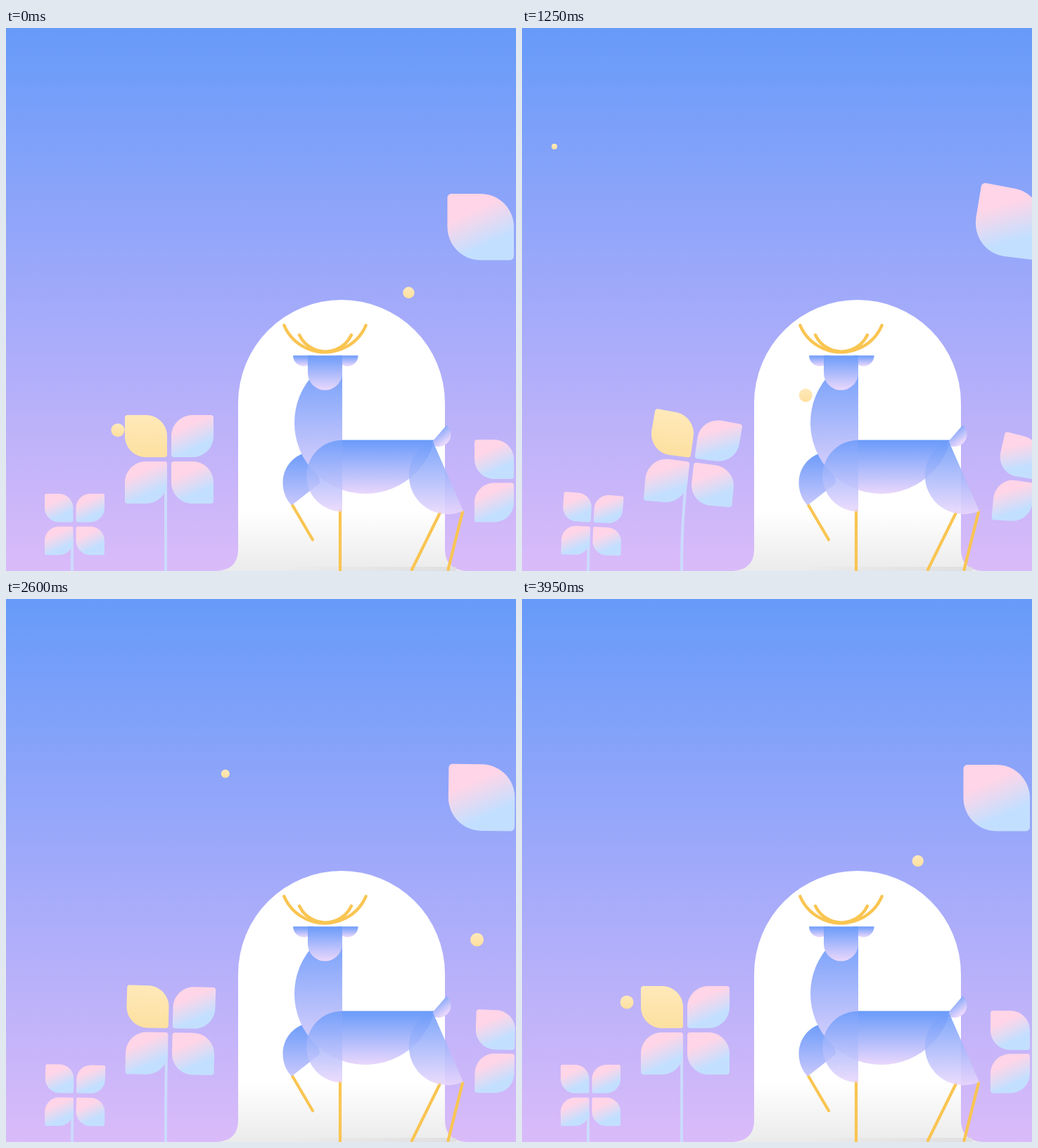
These frames come from a looping animation (725 by 773 pixels, 4000 ms). An HTML page with a canvas:

```html
<!DOCTYPE html>
<html lang="en">
<head>
<meta charset="utf-8">
<title>Deer and flowers</title>
<style>
  html, body { margin: 0; width: 100%; height: 100%; overflow: hidden; }
  canvas { display: block; }
</style>
</head>
<body>
<canvas id="stage" width="725" height="773"></canvas>
<script>
const W = 725, H = 773, LOOP = 4000;
const ctx = document.getElementById('stage').getContext('2d');
const BLUE = '#6a9bfa', LILAC = '#e9d7fc', GOLD = '#f9c552';
const PINK = '#ffd5e7', ICE = '#c3dfff', CREAM = '#ffe9b9', HONEY = '#fde0a0';

function gradient(x0, y0, x1, y1, ...colors) {
  const g = ctx.createLinearGradient(x0, y0, x1, y1);
  colors.forEach((c, i) => g.addColorStop(i / (colors.length - 1), c));
  return g;
}

function fill(style, trace, alpha = 1) {
  ctx.globalAlpha = alpha;
  ctx.fillStyle = style;
  ctx.beginPath();
  trace();
  ctx.fill();
  ctx.globalAlpha = 1;
}

function stroke(style, width, trace) {
  ctx.strokeStyle = style;
  ctx.lineWidth = width;
  ctx.beginPath();
  trace();
  ctx.stroke();
}

// ---- Swaying plants ----

// [time, bend]; eased with a cosine between neighbours
const SWAY = [[0, 0], [700, 1], [950, 1], [1715, -0.72], [2300, 0.14], [2450, 0.14], [3000, 0]];

function sway(t) {
  if (t <= 0 || t >= 3000) return 0;
  const i = SWAY.findIndex(key => key[0] > t);
  const [t0, a] = SWAY[i - 1], [t1, b] = SWAY[i];
  return a + (b - a) * (1 - Math.cos(Math.PI * (t - t0) / (t1 - t0))) / 2;
}

// axis and base: line the plant bends along; amp: curvature at full bend
const PLANTS = [
  { x: 55, y: 663, size: 40.5, dx: 44.5, dy: 46.7, axis: 94, base: 785, amp: 0.0015, delay: 0, petals: 4, stem: 725 },
  { x: 169, y: 551, size: 60, dx: 66, dy: 66, axis: 227, base: 768, amp: 0.001, delay: 150, petals: 4, stem: 640, gold: true },
  { x: 666, y: 586, size: 56, dx: 62, dy: 61.5, axis: 720, base: 745, amp: 0.00155, delay: 300, petals: 2 },
  { x: 627.5, y: 236, size: 94.5, axis: 725, base: 508, amp: 0.00067, delay: 400, petals: 1 }
];

// Wraps the upright axis of a plant onto a circular arc of curvature k
function bender({ axis, base }, k) {
  return (x, y) => {
    const h = base - y;
    if (Math.abs(k) < 1e-7) return [x, y];
    const a = k * h, s = Math.sin(a), c = Math.cos(a);
    return [axis + (1 - c) / k + (x - axis) * c, base - s / k + (x - axis) * s];
  };
}

function petal(bend, x, y, size, flip, gold) {
  const style = gold
    ? gradient(...bend(x + size / 2, y), ...bend(x + size / 2, y + size), CREAM, HONEY)
    : gradient(...bend(x + size * 0.27, y), ...bend(x + size * 0.73, y + size), PINK, PINK, '#e2daf3', ICE, ICE);
  fill(style, () => {
    for (let i = 0; i < 4; i++) {
      const r = size * ((i % 2 === 0) !== flip ? 0.06 : 0.5);
      const cx = i === 1 || i === 2 ? x + size - r : x + r;
      const cy = i > 1 ? y + size - r : y + r;
      for (let j = 0; j <= 12; j++) {
        const a = Math.PI * (1 + i / 2 + j / 24);
        ctx.lineTo(...bend(cx + r * Math.cos(a), cy + r * Math.sin(a)));
      }
    }
    ctx.closePath();
  });
}

function plant(p, t) {
  const bend = bender(p, p.amp * sway(t - p.delay));
  if (p.stem) {
    ctx.lineCap = 'butt';
    stroke('#cbdbfc', 4, () => {
      for (let y = H + 5; y >= p.stem; y -= 3) ctx.lineTo(...bend(p.axis, y));
    });
  }
  for (let i = 0; i < p.petals; i++) {
    const col = i >> 1, row = i & 1;
    petal(bend, p.x + (col ? p.dx : 0), p.y + (row ? p.dy : 0), p.size, col !== row, p.gold && i === 0);
  }
}

// ---- Scenery ----

function backdrop() {
  ctx.fillStyle = gradient(0, 10, 0, H, '#689bf9', '#a2aafa', '#dabbf9');
  ctx.fillRect(0, 0, W, H);

  fill(gradient(0, 687, 0, H, '#fff', '#ebebeb'), () => {
    ctx.moveTo(300, H);
    ctx.quadraticCurveTo(330, 771, 330, 742);
    ctx.lineTo(330, 534);
    ctx.arc(477, 534, 147, Math.PI, 0);
    ctx.lineTo(624, 742);
    ctx.quadraticCurveTo(624, 771, 654, H);
  });
  ctx.fillStyle = gradient(398, 0, 640, 0, 'rgba(220,220,222,0)', 'rgba(220,220,222,.8)');
  ctx.fillRect(398, 767, 242, 6);
}

function deer() {
  const line = (...p) => stroke(GOLD, 4.2, () => {
    ctx.moveTo(p[0], p[1]);
    ctx.lineTo(p[2], p[3]);
  });
  const antler = (x, y, r, tilt) => stroke(GOLD, 4.4, () => ctx.arc(x, y, r, tilt, Math.PI - tilt));
  const shade = (top, bottom) => gradient(0, top, 0, bottom, BLUE, LILAC);

  ctx.lineCap = 'round';
  line(407, 679, 436, 728.5);
  line(475, 686, 475, 780);
  line(617, 690, 577, 771);
  line(649, 689, 628.5, 771);
  antler(453.5, 398, 63.4, 0.41);
  antler(454, 419.6, 40.9, 0.44);

  // raised thigh
  fill(shade(603, 705), () => {
    ctx.moveTo(440, 604);
    ctx.lineTo(424, 605);
    ctx.bezierCurveTo(405, 612, 393.5, 628, 393.5, 647);
    ctx.bezierCurveTo(393.5, 660, 398, 671, 406, 679.5);
    ctx.lineTo(446, 648);
  });

  // neck and body are cut from the same disc
  const disc = (x, y, w, h, style) => {
    ctx.save();
    ctx.beginPath();
    ctx.rect(x, y, w, h);
    ctx.clip();
    fill(style, () => ctx.arc(511, 562, 101, 0, 7));
    ctx.restore();
  };
  disc(400, 460, 78, 210, shade(466, 658));
  disc(478, 586.5, 140, 90, shade(587, 663));

  // chest
  fill(shade(587, 688), () => ctx.arc(478, 637.5, 50.8, Math.PI / 2, Math.PI * 1.5), 0.86);

  // tail
  fill(gradient(610, 570, 625, 590, BLUE, LILAC), () => ctx.arc(615, 578.5, 17.5, -0.86, Math.PI - 0.86));

  // haunch
  fill(shade(587, 692), () => ctx.arc(628, 637, 55.2, 1.16, 1.16 + Math.PI), 0.88);

  // ears and head
  for (const x of [423.3, 485.4]) fill(shade(466, 481), () => ctx.arc(x, 466.3, 15.2, 0, Math.PI));
  fill(shade(466, 515), () => {
    ctx.moveTo(429, 466.3);
    ctx.lineTo(478, 466.3);
    ctx.arc(453.5, 491, 24.5, 0, Math.PI);
  });
}

// ---- Drifting lights ----

function route(d) {
  const path = document.createElementNS('http://www.w3.org/2000/svg', 'path');
  path.setAttribute('d', d);
  return path;
}

const LIGHTS = [
  {
    start: 1000, speed: 0.2075, radius: 3.7, growth: 0.0015,
    path: route('M-6 166C49 168 104 172.5 159 186C231 202 304 245 376 283C442 318 507 351 573 377C642 398 711 417 780 428')
  },
  {
    start: 3000, speed: 0.1995, radius: 9.5, growth: 0,
    path: route('M-40 588C26 587 93 582.5 159 572.5C240 560 321.5 541 402.5 523C468 508.5 533 496 598.5 490.5C652 486 706 482 760 481')
  }
];

function light({ start, speed, radius, growth, path }, t) {
  const age = (t - start + LOOP) % LOOP;
  const { x, y } = path.getPointAtLength(age * speed);
  const r = radius + growth * age;
  fill(gradient(0, y - r, 0, y + r, CREAM, HONEY), () => ctx.arc(x, y, r, 0, 7));
}

const begin = performance.now();

function draw() {
  const t = (performance.now() - begin) % LOOP;
  backdrop();
  deer();
  PLANTS.forEach(p => plant(p, t));
  LIGHTS.forEach(l => light(l, t));
  requestAnimationFrame(draw);
}
draw();
</script>
</body>
</html>
```
